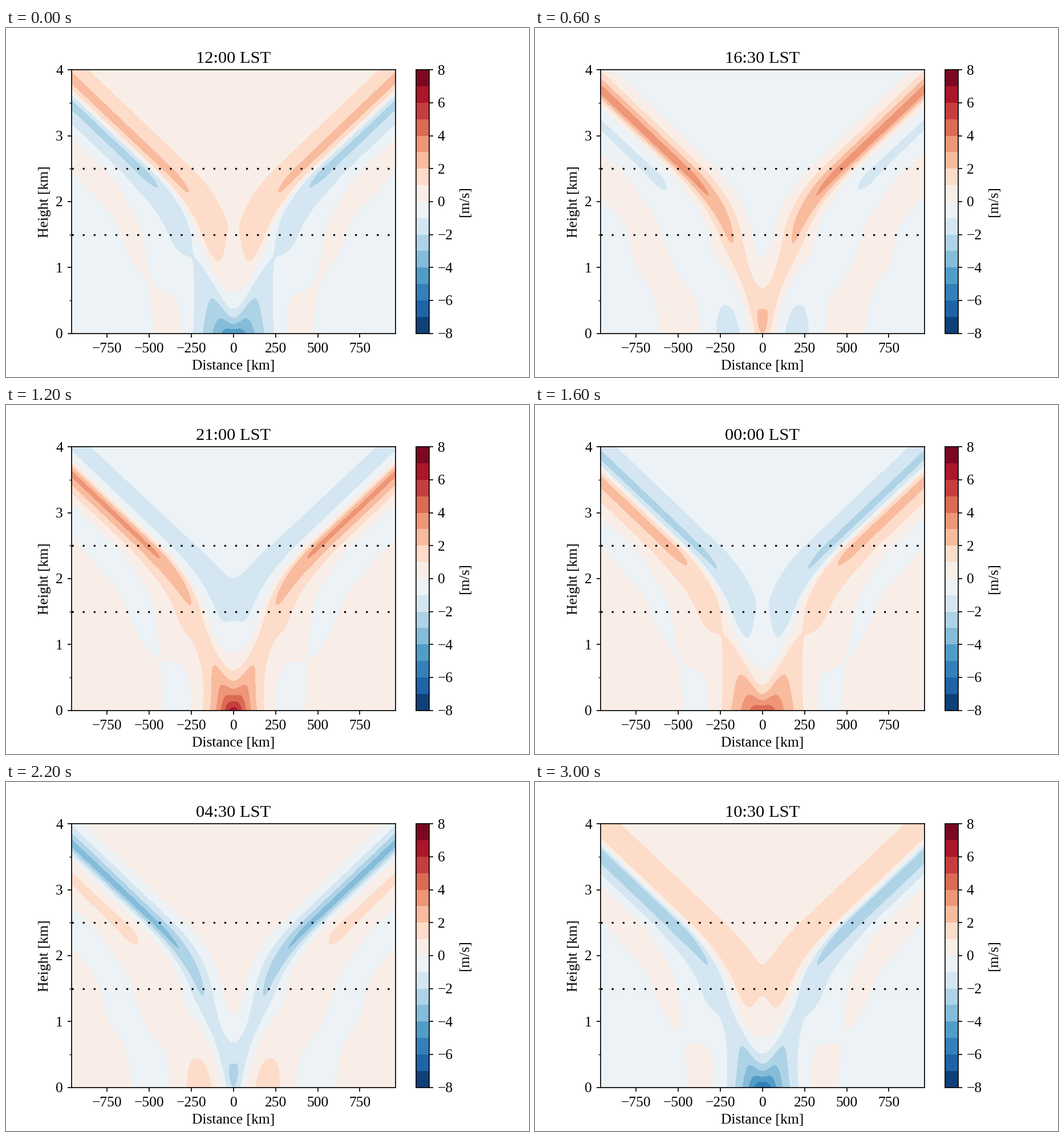
Animation of 917 by 611 pixels, one loop 3200 ms. Source, as a matplotlib script:

```python
"""Diurnal land-sea breeze: linear waves rising through a stability transition."""
import matplotlib.pyplot as plt
import numpy as np
from matplotlib.animation import FuncAnimation

W, H, DPI = 917, 611, 152.8
FRAMES, INTERVAL = 16, 200
DAY = 24.0                    # hours
OMEGA = 2 * np.pi / 86400     # 1/s
N_LOW, N_HIGH = 0.01, 0.03    # buoyancy frequency, 1/s
Z1, Z2, TOP = 1.5, 2.5, 4.0   # transition layer and domain top, km
SCALE = N_LOW / OMEGA         # horizontal scale for 1 km heating depth, km
COAST = 50 / SCALE            # half width of the coastal heating gradient
PEAK = 6.52                   # wind amplitude at the coast, m/s


def solve_streamfunction(q, z):
    """Solve psi'' + (q c)^2 psi = exp(-z), psi(0) = 0, radiating at the top."""
    dz = z[1] - z[0]
    ratio = N_HIGH / N_LOW
    c = 1 + (ratio - 1) * np.clip((z - Z1) / (Z2 - Z1), 0, 1)
    source = np.exp(-z)
    n = len(z)

    # outgoing wave plus forced part above the last level
    half = 1 - (q * ratio * dz) ** 2 / 2
    step = half + 1j * np.sqrt(1 - half ** 2)
    forced = source[-1] / (1 + (q * ratio) ** 2)
    alpha = np.empty((n, len(q)), complex)
    beta = np.empty_like(alpha)
    alpha[-1] = step
    beta[-1] = forced * (np.exp(-dz) - step)

    # psi[j + 1] = alpha[j] * psi[j] + beta[j]
    for j in range(n - 1, 0, -1):
        alpha[j - 1] = 1 / (2 - (q * c[j] * dz) ** 2 - alpha[j])
        beta[j - 1] = (beta[j] - dz ** 2 * source[j]) * alpha[j - 1]
    psi = np.zeros_like(alpha)
    for j in range(n - 1):
        psi[j + 1] = alpha[j] * psi[j] + beta[j]
    return psi


def complex_wind(x, every=8):
    """Complex amplitude of the horizontal wind, and its heights."""
    z = np.linspace(0, TOP, 1601)
    dq = 0.05
    q = (np.arange(600) + 0.5) * dq
    psi = solve_streamfunction(q, z)
    u_hat = np.gradient(psi, z[1], axis=0, edge_order=2)[::every]
    wind = (u_hat * np.exp(-COAST * q)) @ np.cos(np.outer(q, x))
    return z[::every], wind * PEAK / abs(wind[0, len(x) // 2])


plt.rcParams.update({"font.family": "Liberation Serif", "font.size": 12})

x = np.linspace(-7, 7, 561)
z, wind = complex_wind(x)
x_km = x * SCALE
levels = np.arange(-8, 9)

fig, ax = plt.subplots(figsize=((W + 0.01) / DPI, (H + 0.01) / DPI), dpi=DPI)
fig.subplots_adjust(left=0.125, right=0.9, bottom=0.125, top=0.88)


def draw_field(frame):
    phase = 2 * np.pi * frame / FRAMES
    u = (wind * np.exp(1j * phase)).real
    return ax.contourf(x_km, z, u, levels=levels, cmap="RdBu_r")


field = draw_field(0)
cbar = fig.colorbar(field, ax=ax, ticks=levels[::2])
cbar.set_label("[m/s]", labelpad=5)
cbar.minorticks_off()

for height in (Z1, Z2):
    ax.axhline(height, color="black", lw=1.5, ls=(0, (1, 5)))
ax.set(xlim=(x_km[0], x_km[-1]), ylim=(0, TOP),
       xlabel="Distance [km]", ylabel="Height [km]")
ax.set_xticks(np.arange(-750, 751, 250))
ax.set_yticks(np.arange(5))
ax.set_yticks(np.arange(0.5, TOP, 1), minor=True)
ax.tick_params(axis="x", pad=4)
title = ax.set_title("")


def update(frame):
    global field
    field.remove()
    field = draw_field(frame)
    hour = (12 + DAY * frame / FRAMES) % DAY
    title.set_text(f"{int(hour):02d}:{int(hour % 1 * 60):02d} LST")
    return field, title


anim = FuncAnimation(fig, update, frames=FRAMES, interval=INTERVAL,
                     repeat=True, repeat_delay=0)
plt.show()
```
